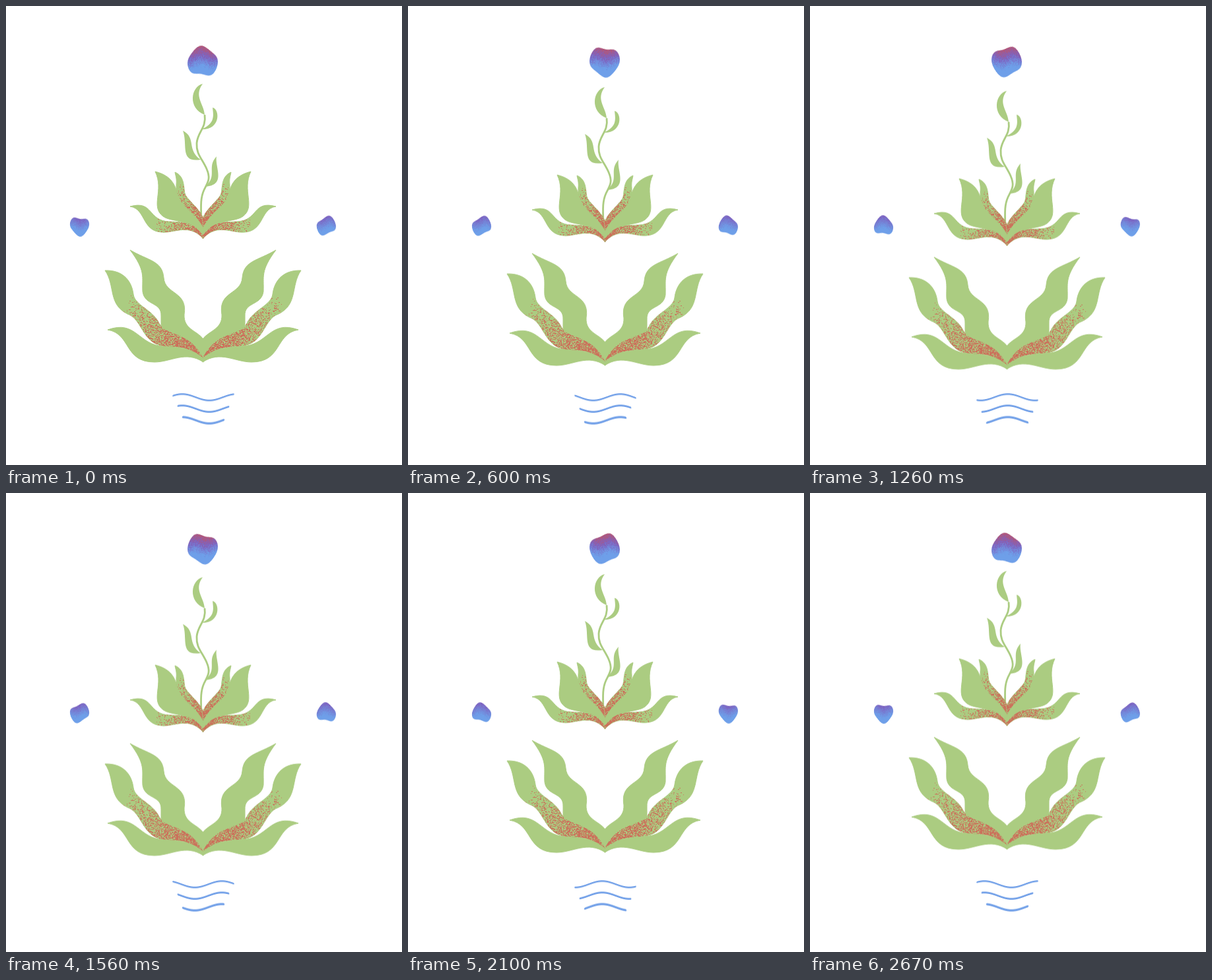
An HTML page with a canvas for the animation above (2.7 s loop, 600 by 696 pixels).

```html
<!DOCTYPE html>
<html lang="en">
<head>
<meta charset="utf-8">
<title>Floating plant</title>
<style>
html, body { margin: 0; width: 100%; height: 100%; overflow: hidden; background: #fff; }
canvas { display: block; }
</style>
</head>
<body>
<canvas id="stage" width="600" height="696"></canvas>
<script>
const W = 600, H = 696, LOOP = 2700, STEP = 30, WAVE_PERIOD = 900, DRIFT = 11.5;
const AXIS = 298.5;
const GREEN = '#abcc81', RED = 'rgba(207, 104, 88, .85)', BLUE = '#709fe8';
const ROSE = [180, 86, 118], PURPLE = [125, 99, 193], SKY = [110, 159, 233];
const stage = document.getElementById('stage').getContext('2d');

let seed = 7;
const random = () => (seed = (seed * 16807) % 2147483647) / 2147483647;

function layer() {
  const canvas = document.createElement('canvas');
  canvas.width = W;
  canvas.height = H;
  return canvas.getContext('2d');
}

const STEM = 'M296 326C295 300 295 290 300 279S311 263 304 247S288 225 289 208S304 185 301 165';
const STEM_LEAVES = [
  'M298 118C280 122 275 155 301 165C300 148 284 137 298 118',
  'M313 154C324 156 326 188 296 187C318 178 314 165 313 154',
  'M268 189C289 200 273 218 295 233C262 238 276 210 268 189',
  'M319 228C316 245 335 272 301 274C322 258 303 245 319 228'
].join('');

// Left-hand leaves, back to front; grain is the base, reach and strength of the red specks.
const LEAVES = [
  { d: 'M256 252C271 258 269 275 271 284S293 306 299 322V340L258 300V271C259 262 257 258 256 252', grain: [332, 72, .85] },
  { d: 'M226 251C254 258 257 275 261 289S290 316 299 338V347C276 322 250 328 238 319C218 304 240 280 226 251' },
  { d: 'M188 304C224 294 214 326 248 327S285 332 299 348V353C280 332 262 341 243 343C204 346 214 308 188 304', grain: [348, 76, .9] },
  { d: 'M188 370C215 386 237 386 239 412S276 432 270 468C269 490 289 492 299 505V534L235 500V470C236 448 210 455 207 433C206 410 212 402 188 370' },
  { d: 'M154 491C198 475 200 515 240 516C270 517 285 523 299 533V540C272 522 250 540 225 540C178 540 190 497 154 491' },
  { d: 'M150 401C180 400 191 420 193 437S222 460 232 481S276 490 299 534C274 513 255 518 236 515C206 510 206 474 184 467C154 452 166 424 150 401', grain: [533, 148, .85] }
];

// Red specks inside a leaf, thinning out away from its base.
function speckle(ctx, path, baseY, reach, strength) {
  ctx.save();
  ctx.clip(path);
  ctx.fillStyle = RED;
  for (let y = baseY - reach; y < baseY + 20; y++) {
    for (let x = 299 - reach; x < 300; x++) {
      const fade = 1 - Math.hypot(x - AXIS, y - baseY) / reach;
      if (random() < fade * strength) ctx.fillRect(x, y, random() < .35 ? 2 : 1, 1);
    }
  }
  ctx.restore();
}

function makePlant() {
  const ctx = layer();
  ctx.fillStyle = ctx.strokeStyle = GREEN;
  ctx.lineWidth = 2.8;
  ctx.stroke(new Path2D(STEM));
  ctx.fill(new Path2D(STEM_LEAVES));
  ctx.lineWidth = 1;
  for (const mirrored of [false, true]) {
    if (mirrored) ctx.setTransform(-1, 0, 0, 1, 2 * AXIS, 0);
    for (const { d, grain } of LEAVES) {
      const path = new Path2D(d);
      ctx.fillStyle = GREEN;
      ctx.fill(path);
      ctx.stroke(path);
      if (grain) speckle(ctx, path, ...grain);
    }
  }
  return ctx.canvas;
}

// Grainy vertical gradient in an ellipse.
function makeBlob(cx, cy, rx, ry, stops, crest, length) {
  const ctx = layer(), last = stops.length - 1;
  ctx.ellipse(cx, cy, rx, ry, 0, 0, 7);
  ctx.clip();
  for (let y = Math.floor(cy - ry); y < cy + ry; y++) {
    for (let x = Math.floor(cx - rx); x < cx + rx; x++) {
      const v = (y - cy + ry) / (2 * ry) + (random() - .5) * .24;
      const pos = Math.max(0, Math.min(last - .001, v * 1.5 * last));
      const i = Math.floor(pos);
      const rgb = stops[i].map((c, k) => c + (stops[i + 1][k] - c) * (pos - i));
      ctx.fillStyle = `rgb(${rgb})`;
      ctx.fillRect(x, y, 1, 1);
    }
  }
  return { image: ctx.canvas, cx, reach: rx + 2, crest, length, size: 2.8 };
}

function makeWater() {
  const ctx = layer();
  ctx.strokeStyle = BLUE;
  ctx.lineCap = 'round';
  for (let i = 0; i < 3; i++) {
    const half = 45.5 - 7.5 * i, y = 593.2 + 17.5 * i;
    ctx.lineWidth = 2.4 + .4 * i;
    ctx.beginPath();
    ctx.moveTo(299 - half, y);
    ctx.lineTo(299 + half, y);
    ctx.stroke();
  }
  return { image: ctx.canvas, cx: 299, reach: 50, crest: 267, length: 82, size: 4.8 };
}

const plant = makePlant();
const waves = [
  makeBlob(298, 84.3, 23, 21.6, [ROSE, PURPLE, SKY], 295, 36),
  makeBlob(111.5, 333.5, 14.6, 13.4, [PURPLE, SKY], 99, 28),
  makeBlob(485.3, 333.3, 14.6, 13.4, [PURPLE, SKY], 491, 28),
  makeWater()
];

// Bends a layer by a vertical wave travelling right; crest is its place at time 0.
function drawWave({ image, cx, reach, crest, length, size }, t) {
  for (let x = Math.floor(cx - reach); x < cx + reach; x++) {
    const dy = -size * Math.cos(2 * Math.PI * ((x + .5 - crest) / length - t / WAVE_PERIOD));
    stage.drawImage(image, x, 0, 1, H, x, dy, 1, H);
  }
}

function draw() {
  const t = Math.floor(performance.now() / STEP) * STEP % LOOP;
  stage.clearRect(0, 0, W, H);
  stage.drawImage(plant, 0, DRIFT * (1 - Math.abs(1 - 2 * t / LOOP)));
  waves.forEach(wave => drawWave(wave, t));
  requestAnimationFrame(draw);
}
draw();
</script>
</body>
</html>
```
